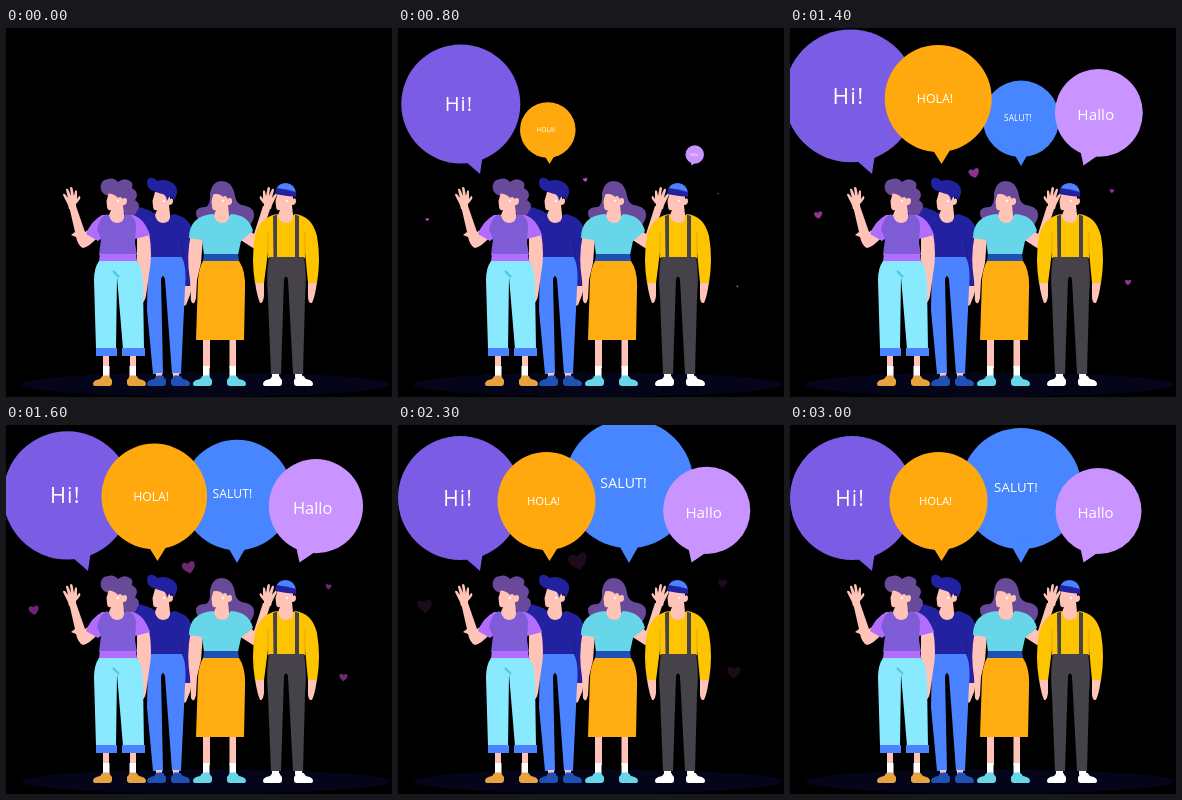
Write an HTML page that moves like this. It is 386 px wide and 369 px high and loops after 3100 ms.

```html
<!DOCTYPE html>
<html lang="en">
<head>
<meta charset="utf-8">
<title>Greetings</title>
<style>
  html, body { margin: 0; width: 100%; height: 100%; overflow: hidden; background: #000; }
  svg { display: block; width: 100vw; height: 100vh; }
  text { font-family: "Open Sans", "Noto Sans", sans-serif; font-weight: 500; fill: #fff; text-anchor: middle; }
  .skin { fill: #ffc3b8; }
  .hair { fill: #69499a; }
  .navy { fill: #2222a0; }
  .blue { fill: #4a82ff; }
  .deep { fill: #1f50b4; }
  .violet { fill: #7d5cd6; }
  .lilac { fill: #b26cff; }
  .cyan { fill: #88e9ff; }
  .teal { fill: #66d6e8; }
  .orange { fill: #ffad10; }
  .tan { fill: #e8a23e; }
  .yellow { fill: #ffc400; }
  .dark { fill: #454249; }
  .white { fill: #fff; }
</style>
</head>
<body>
<svg viewBox="0 0 386 369" xmlns="http://www.w3.org/2000/svg">
  <defs>
    <path id="shoe" d="M0 9Q0 5.500 5 4.500Q8 4 9 1.500Q10 0 13 .5H16Q17 3 19 5V8Q19 11 16 11H3Q0 11 0 9Z"/>
    <path id="head" d="M2 0Q10 -3 17 1L17 7Q20 5 20 9Q20 13 16 13L17 23Q18 30 10 31Q3 30 2 23L4 18Q0 19 0 14L-.5 9Z"/>
    <path id="hand" d="M6 22Q5 17 3 14L0 8Q0 6 2 7L5 11L3 3Q3 1 5 2L8 9L7 1Q8 -1 9.500 1L11 9L12 4Q14 2 14 5L14 12L16 9Q18 9 17 12Q15 15 13 17L13 22Z"/>
  </defs>
  <rect width="386" height="369"/>
  <ellipse cx="200" cy="356.500" rx="185" ry="12" fill="#05051a"/>

  <!-- man in navy -->
  <g>
    <path class="navy" d="M150 186Q137 178 123 178L122 190L142 208V230H177V258Q182 260 186 258V205Q186 190 168 186Q159 190 150 186Z"/>
    <path d="M175.500 210L177 229V258" fill="none" stroke="#17177a" stroke-width=".7"/>
    <path class="skin" d="M178 258H186L184 267L180 277Q176 280 177 271Z"/>
    <path class="blue" d="M142 229H176Q181 240 179 260L175 346H166L159 251Q157 245 155 251L157 346H147L141 282Z"/>
    <path class="skin" d="M150 345H156V349H150ZM167 345H173V349H167Z"/>
    <use href="#shoe" class="deep" transform="translate(141 347)"/>
    <use href="#shoe" class="deep" transform="matrix(-1 0 0 1 184 347)"/>
    <use href="#head" class="skin" transform="translate(147 164)"/>
    <path class="navy" d="M141 155Q141 149 147 150Q150 151 151 153Q160 150 168 156Q173 161 170 168L168 174Q168 168 163 169L161 173Q160 166 156 166Q150 164 147 163Q141 160 141 155Z"/>
    <circle cx="158" cy="173" r="1.300" fill="#fff3ef"/>
  </g>

  <!-- woman in violet -->
  <g>
    <path class="hair" d="M95 162Q93 152 102 151Q108 149 112 154Q117 150 122 152Q128 154 126 160Q134 165 129 172Q136 177 131 183Q129 190 121 187L109 181L103 168Q97 167 95 162Z"/>
    <use href="#hand" class="skin" transform="translate(57 159)"/>
    <path class="skin" d="M63 178H70L79 204L84 201L92 209Q83 219 77 220Q72 218 70 209L65 207L69 204Z"/>
    <path class="skin" d="M131 204L143 205Q147 226 143 246L140 268Q138 276 135 274L134 250L131 232Z"/>
    <path class="lilac" d="M96 187Q85 193 80 206L92 213L96 210L129 211L144 207Q138 190 127 187Z"/>
    <path class="violet" d="M101 186Q110 196 119 186Q130 187 130 198L129 215L131 227H93L95 211L91 202Q93 190 101 186Z"/>
    <path class="lilac" d="M94 226H130L131 233H93Z"/>
    <path class="cyan" d="M93 233H131Q137 242 137 256L138 321H117L111 249L110 321H90L88 252Q88 240 93 233Z"/>
    <path d="M107 243L113 249" stroke="#52bfe2" stroke-width="1.800"/>
    <path class="blue" d="M90 320H111V328H90ZM116 320H139V328H116Z"/>
    <path class="skin" d="M97 328H103V339H97ZM124 328H130V339H124Z"/>
    <path class="white" d="M97 338H103.500V349H97ZM123.500 338H130V349H123.500Z"/>
    <use href="#shoe" class="tan" transform="translate(87 347)"/>
    <use href="#shoe" class="tan" transform="matrix(-1 0 0 1 140 347)"/>
    <use href="#head" class="skin" transform="translate(101 164)"/>
    <path class="hair" d="M98 164Q98 158 106 157Q116 156 122 165L123 178L117 172Q115 167 112 170Q108 165 98 165Z"/>
    <path class="skin" d="M116 171Q121 168 121 173Q121 177 116 177Z"/>
    <circle cx="112" cy="173" r="1.300" fill="#fff3ef"/>
  </g>

  <!-- woman in teal -->
  <g>
    <path class="hair" d="M204 166Q206 153 216 153Q227 154 229 168Q230 177 240 178Q249 180 248 189Q245 201 233 200L205 199Q190 195 190 184Q191 179 200 179Q205 176 204 166Z"/>
    <use href="#hand" class="skin" transform="matrix(-1 0 0 1 271 159)"/>
    <path class="skin" d="M257 178H265L254 212Q251 219 247 220L233 211L243 202L248 206Z"/>
    <path class="skin" d="M185 206L197 209L195 235L191 252L190 270Q188 279 185 273L184 252Q180 228 185 206Z"/>
    <path class="teal" d="M207 186Q216 197 225 186Q243 187 247 203L235 213L232 227H198L196 212L183 210Q183 188 207 186Z"/>
    <path class="deep" d="M198 226H232L233 233H197Z"/>
    <path class="skin" d="M197 310H204V340H197ZM223.500 310H230V340H223.500Z"/>
    <path class="orange" d="M197 233H233Q240 243 239 262L238 312H190L192 252Q193 240 197 233Z"/>
    <path class="white" d="M197 338H203.500V349H197ZM223.500 338H230V349H223.500Z"/>
    <use href="#shoe" class="teal" transform="translate(187 347)"/>
    <use href="#shoe" class="teal" transform="matrix(-1 0 0 1 240 347)"/>
    <use href="#head" class="skin" transform="translate(206 164)"/>
    <path class="hair" d="M204 167Q206 156 216 156Q228 158 228 174L222 172Q220 166 217 169Q213 164 204 167Z"/>
    <path class="skin" d="M221 171Q226 168 226 173Q226 177 221 177Z"/>
    <circle cx="217" cy="173" r="1.300" fill="#fff3ef"/>
  </g>

  <!-- man with cap -->
  <g>
    <path class="skin" d="M249 254H258V268Q257 276 254 275Q251 268 249 254ZM302 254H311Q309 269 306 275Q302 276 302 268Z"/>
    <path class="yellow" d="M271 186Q280 193 289 186Q306 188 311 208Q315 232 311 255H302L299 224V230H262V224L258 255H249Q245 232 249 208Q254 189 271 186Z"/>
    <path d="M262 204V229M299 204V229" stroke="#d89a00" stroke-width=".7"/>
    <path class="dark" d="M267 188L271 186.500V230H267.500ZM289 186.500L293 188V230H289Z"/>
    <path class="dark" d="M263 229H298Q301 245 299 270L297 346H287L282 251Q280 246 278 251L275 346H265L262 270Q260 245 263 229Z"/>
    <path class="white" d="M266 346H273V350H266ZM289 346H296V350H289Z"/>
    <use href="#shoe" class="white" transform="translate(257 347)"/>
    <use href="#shoe" class="white" transform="matrix(-1 0 0 1 307 347)"/>
    <use href="#head" class="skin" transform="translate(270 164)"/>
    <path class="blue" d="M270 162Q272 155 280 155Q289 156 290 165Z"/>
    <path class="navy" d="M270 160Q280 161 290 164V169Q279 168 269 166Z"/>
    <circle cx="281" cy="173" r="1.300" fill="#fff3ef"/>
  </g>

  <g id="hearts"></g>
  <g id="bubbles"></g>
</svg>
<script>
const LOOP = 3100, STEP = 100;

// Each bubble grows from its tail tip, which is its local origin.
const bubbles = [
  { tip: [82, 146], c: [-20, -73], r: 62, tail: '-15,-13 -12,-40 3,-20', color: '#7b5ce4',
    text: 'Hi!', at: [-22, -73], size: 21, space: 1.1, delay: 0 },
  { tip: [231, 138], c: [0, -74.5], r: 60.6, tail: '-9,-16 0,-30 9,-16', color: '#4886ff',
    text: 'SALUT!', at: [-5, -75.5], size: 13.2, space: 0.2, delay: 835 },
  { tip: [151.5, 136], c: [-3, -60], r: 49, tail: '-8,-13 0,-30 8,-13', color: '#ffa90f',
    text: 'HOLA!', at: [-6, -60], size: 11.3, space: 0, delay: 275 },
  { tip: [293.5, 137.5], c: [15, -51.5], r: 43, tail: '-3,-14 5,-30 13,-9', color: '#c994ff',
    text: 'Hallo', at: [12, -49.5], size: 15, space: 0, delay: 515 }
];

const hearts = [
  { from: [30, 194.5], to: [27, 181], size: 15.5, turn: -8, delay: 0 },
  { from: [189.5, 156.5], to: [180, 136], size: 20, turn: -14, delay: 0 },
  { from: [319.5, 167], to: [325, 157.5], size: 11, turn: 8, delay: 200 },
  { from: [340, 260.5], to: [335.5, 246], size: 15.5, turn: 3, delay: 200 }
];

const pop = [[100, 0], [125, .05], [285, .215], [400, .363], [600, .69], [800, .96], [950, 1.07],
  [1080, 1.095], [1350, 1.075], [1500, 1.06], [1600, 1.035], [1900, 1]];
const drift = [[300, 0], [400, .05], [800, .23], [1200, .43], [1600, .7], [2300, 1], [2700, 1.1]];
const fade = [[800, 1], [1200, .85], [1600, .55], [2300, .14], [2700, 0]];

function sample(keys, t) {
  if (t <= keys[0][0]) return keys[0][1];
  for (let i = 1; i < keys.length; i++) {
    const [t0, v0] = keys[i - 1], [t1, v1] = keys[i];
    if (t < t1) return v0 + (v1 - v0) * (t - t0) / (t1 - t0);
  }
  return keys[keys.length - 1][1];
}

function add(parent, tag, attrs, text) {
  const el = document.createElementNS('http://www.w3.org/2000/svg', tag);
  for (const k in attrs) el.setAttribute(k, attrs[k]);
  if (text) el.textContent = text;
  return parent.appendChild(el);
}

for (const b of bubbles) {
  b.el = add(document.getElementById('bubbles'), 'g', { fill: b.color });
  add(b.el, 'circle', { cx: b.c[0], cy: b.c[1], r: b.r });
  add(b.el, 'polygon', { points: '0,0 ' + b.tail });
  add(b.el, 'text', { x: b.at[0], y: b.at[1] + b.size * 0.36, 'font-size': b.size,
    'letter-spacing': b.space }, b.text);
}

for (const h of hearts) {
  h.el = add(document.getElementById('hearts'), 'path', {
    fill: '#c548cf',
    d: 'M0 .45C-.8 -.05 -.42 -.65 0 -.25C.42 -.65 .8 -.05 0 .45Z'
  });
}

function draw(t) {
  for (const b of bubbles) {
    const s = sample(pop, t - b.delay);
    b.el.setAttribute('display', s > 0 ? 'inline' : 'none');
    b.el.setAttribute('transform', `translate(${b.tip}) scale(${s})`);
  }
  for (const h of hearts) {
    const k = sample(drift, t - h.delay);
    const pos = h.from.map((v, i) => v + (h.to[i] - v) * k);
    h.el.setAttribute('display', k > 0 ? 'inline' : 'none');
    h.el.setAttribute('transform', `translate(${pos}) rotate(${h.turn}) scale(${h.size * k})`);
    h.el.setAttribute('opacity', sample(fade, t));
  }
}

const start = performance.now();
function tick() {
  const t = (performance.now() - start) % LOOP;
  draw(Math.floor(t / STEP) * STEP);
  requestAnimationFrame(tick);
}
tick();
</script>
</body>
</html>
```
